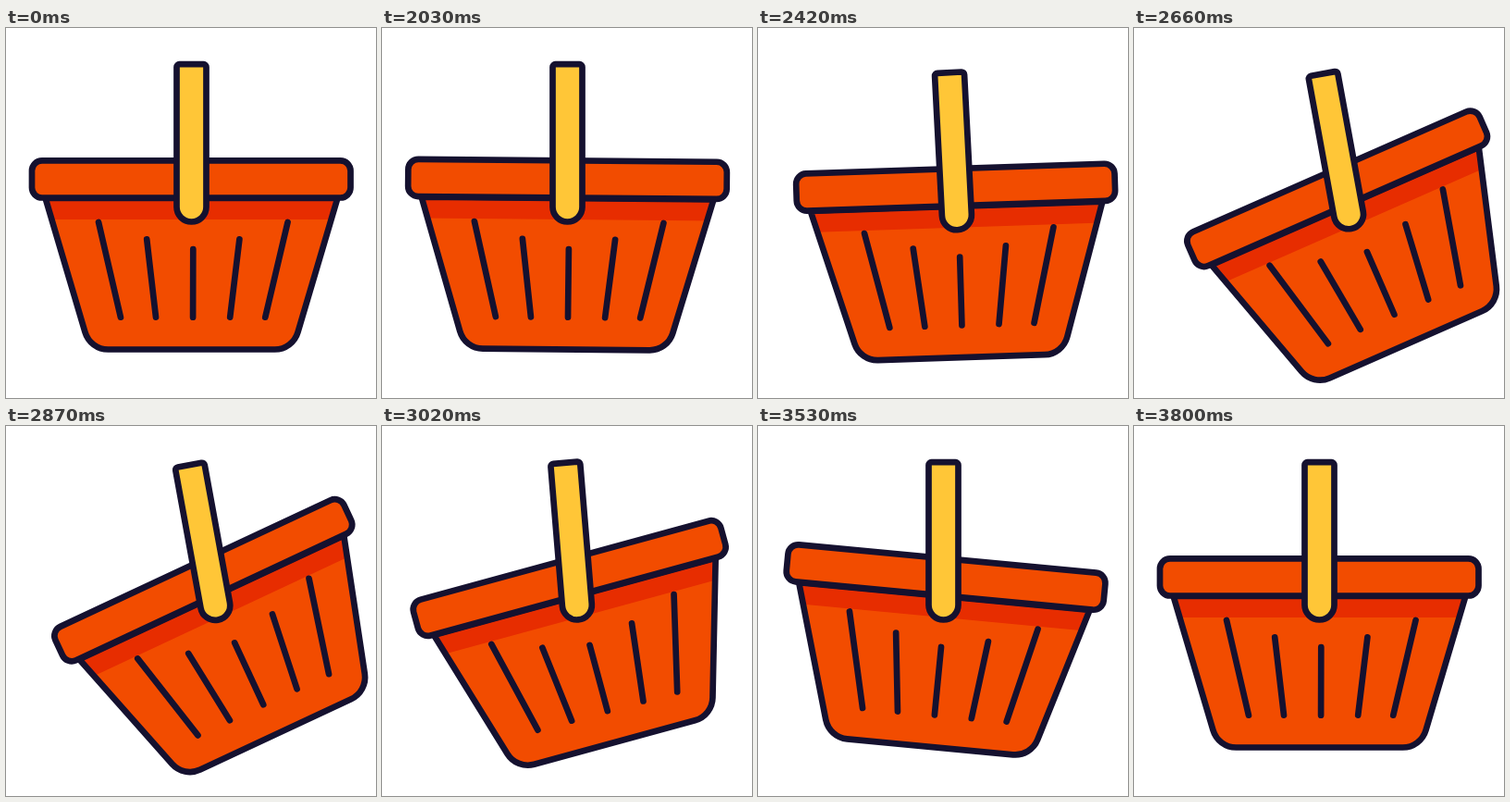
These frames come from a looping animation (400x400 px, 3830 ms). An HTML page with a canvas:

```html
<!DOCTYPE html>
<html lang="en">
<head>
<meta charset="utf-8">
<title>Swinging basket</title>
<style>
  html, body { margin: 0; width: 100%; height: 100%; overflow: hidden; background: #fff; }
  canvas { display: block; width: 100vw; height: 100vh; }
</style>
</head>
<body>
<canvas id="stage"></canvas>
<script>
const LOOP = 3830, START = 2030, STEP = 30;
const INK = '#15112f', BODY = '#f24c00', SHADE = '#e72d00', GOLD = '#ffc637';
const CENTER = 200.5, HINGE = 193.5;

const canvas = document.getElementById('stage');
const ctx = canvas.getContext('2d');

function ease(t, from, to) {
  const u = Math.min(1, Math.max(0, (t - from) / (to - from)));
  return (1 - Math.cos(Math.PI * u)) / 2;
}

// Rises from 0 to 1, holds, then falls back to 0
function pulse(t, rise, top, fall, end) {
  return ease(t, rise, top) - ease(t, fall, end);
}

function poseAt(t) {
  return {
    tilt: 8 * pulse(t, 1990, 2235, 3360, 3800) - 34 * pulse(t, 2235, 2745, 2812, 3360),
    lean: -11.2 * pulse(t, 2250, 2745, 2800, 3200),
    x: 31.5 * pulse(t, 2205, 2660, 2743, 3196),
    y: 10 * pulse(t, 2200, 2485, 2540, 2920)
  };
}

function turned(deg, draw) {
  ctx.save();
  ctx.translate(CENTER, HINGE);
  ctx.rotate(deg * Math.PI / 180);
  ctx.translate(-CENTER, -HINGE);
  draw();
  ctx.restore();
}

function panel(x, y, w, h, radius, fill) {
  ctx.beginPath();
  ctx.roundRect(x, y, w, h, radius);
  ctx.fillStyle = fill;
  ctx.fill();
  ctx.stroke();
}

function drawTub() {
  const top = 184, floor = 347.5, wide = 157.9, narrow = 109.5, radius = 26;
  const tub = new Path2D();
  tub.moveTo(CENTER - wide, top);
  tub.arcTo(CENTER - narrow, floor, CENTER, floor, radius);
  tub.arcTo(CENTER + narrow, floor, CENTER + wide, top, radius);
  tub.lineTo(CENTER + wide, top);
  tub.closePath();

  ctx.fillStyle = BODY;
  ctx.fill(tub);
  ctx.save();
  ctx.clip(tub);
  ctx.fillStyle = SHADE;
  ctx.fillRect(30, top, 340, 23);
  ctx.restore();
  ctx.stroke(tub);
}

// Ribs fan out and grow longer towards the sides
function drawRibs() {
  for (let i = -2; i <= 2; i++) {
    const bend = 0.34 * (i ** 3 - i);
    ctx.beginPath();
    ctx.moveTo(202.3 + 50.1 * i + bend, 239 - 6.9 * Math.abs(i) - 3.8 * i * i);
    ctx.lineTo(202.1 + 40.1 * i - bend, 312.7);
    ctx.stroke();
  }
}

function drawBasket() {
  drawTub();
  drawRibs();
  panel(28, 143.3, 344.5, 40.2, 11, BODY);
}

function drawHandle() {
  panel(184.5, 39.2, 32, 170.3, [3, 3, 16, 16], GOLD);
}

function render(t) {
  const ratio = window.devicePixelRatio || 1;
  const w = Math.round(innerWidth * ratio), h = Math.round(innerHeight * ratio);
  if (canvas.width !== w || canvas.height !== h) {
    canvas.width = w;
    canvas.height = h;
  }
  ctx.setTransform(w / 400, 0, 0, h / 400, 0, 0);
  ctx.fillStyle = '#fff';
  ctx.fillRect(0, 0, 400, 400);
  ctx.strokeStyle = INK;
  ctx.lineWidth = 6.7;
  ctx.lineCap = ctx.lineJoin = 'round';

  const time = t < START ? 0 : START + Math.floor((t - START) / STEP) * STEP;
  const pose = poseAt(time);
  ctx.translate(pose.x, pose.y);
  turned(pose.tilt, drawBasket);
  turned(pose.lean, drawHandle);
}

function tick() {
  render(performance.now() % LOOP);
  requestAnimationFrame(tick);
}
tick();
</script>
</body>
</html>
```
